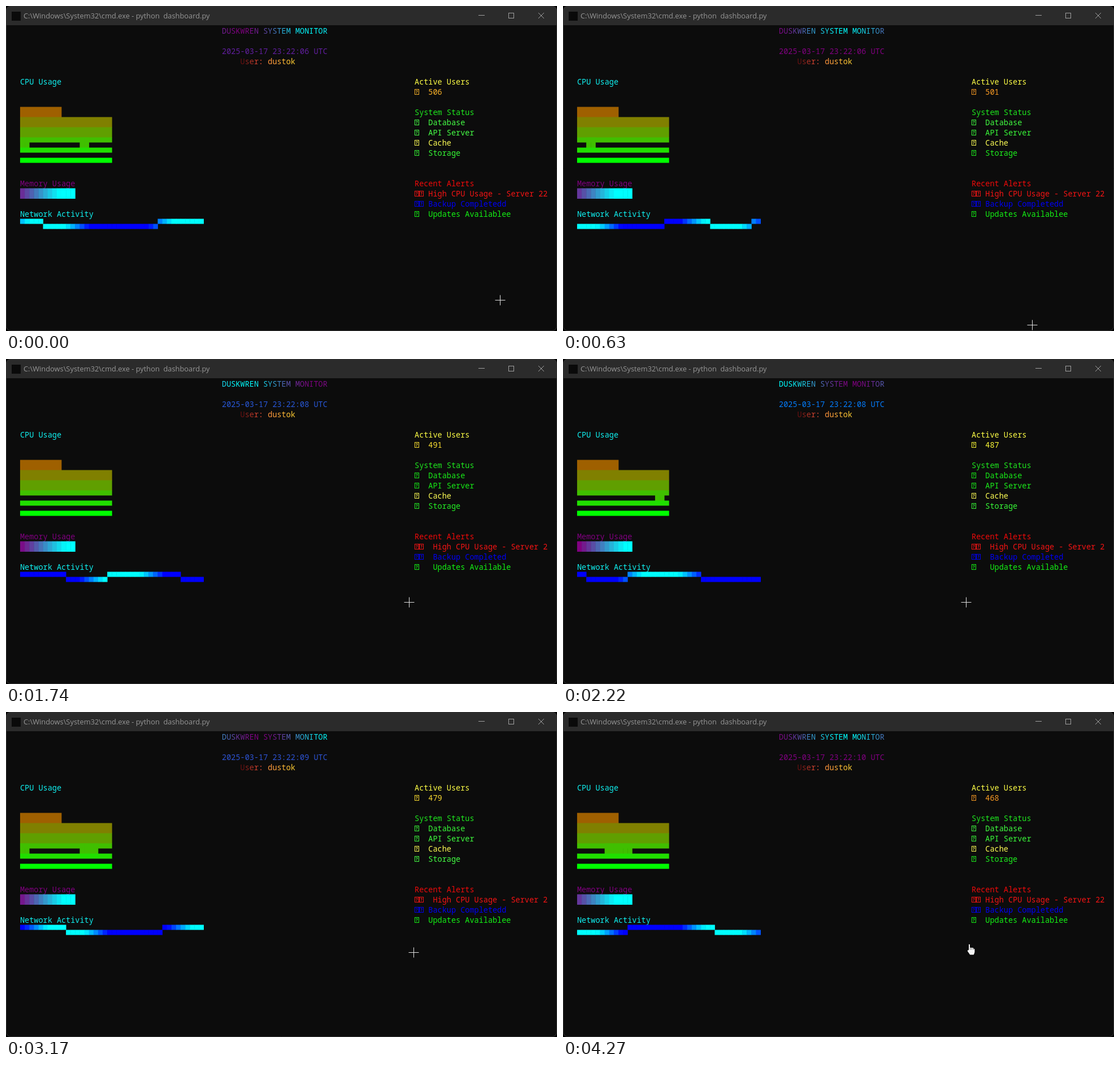
An HTML page with a canvas that plays this animation: 975 by 575 pixels, repeating every 4350 ms.

```html
<!DOCTYPE html>
<html lang="en">
<head>
<meta charset="utf-8">
<title>System monitor</title>
<style>
html, body { margin: 0; width: 100%; height: 100%; overflow: hidden; background: #000; }
canvas { display: block; }
</style>
</head>
<body>
<canvas id="stage" width="975" height="575"></canvas>
<script>
const ctx = document.getElementById('stage').getContext('2d');
const LOOP = 4350, REFRESHES = 55, CYCLE = 3650, CELL = 8.117, ROW = 18;
const PURPLE = [128, 0, 128], CYAN = [0, 255, 255];

// Cells on the network tape where the trace jumps between its two levels
const JUMPS = [5, 30, 40, 49, 65, 86, 105];
// Pointer path: [time, x, y]
const POINTER = [[0, 874, 520], [630, 830, 564], [1110, 764, 583], [1740, 713, 430], [2380, 713, 430], [2780, 721, 425]];

const clamp = v => Math.max(0, Math.min(1, v));
const mix = (a, b, k) => `rgb(${a.map((v, i) => Math.round(v + (b[i] - v) * k))})`;
const colX = col => 0.6 + col * CELL;
const rowY = row => 34.5 + row * ROW;

// 0..1 pulse, highest at the given time
const pulse = (t, peak) => 0.5 + 0.5 * Math.cos(2 * Math.PI * (t - peak) / CYCLE);
// 0..1 wave over columns, travelling left
const wave = (i, low, t) => 0.5 - 0.5 * Math.cos(0.2 * (i - low) + 2 * Math.PI * t / CYCLE);

const traceIsHigh = cell => JUMPS.filter(jump => jump <= cell).length % 2 === 0;
// Short regular spikes that widen as the load moves away from its quiet spell
const loadSpikes = cell => Math.cos(2 * Math.PI * cell / 13.9) + Math.abs(cell - 34) / 60 > 1.22;

function print(text, col, row, color) {
  ctx.font = '500 13.54px "Noto Sans Mono", monospace';
  [...text].forEach((ch, i) => {
    ctx.fillStyle = typeof color === 'function' ? color(i) : color;
    if (ch !== ' ') ctx.fillText(ch, colX(col + i), rowY(row) + 14.5);
  });
}

// Blocks overlap their neighbours slightly so that no seams show.
function block(col, row, count, color, half) {
  ctx.fillStyle = color;
  ctx.fillRect(colX(col), rowY(row) + (half === 'low' ? 9 : 0), count * CELL + 0.4, half ? 9 : 18.5);
}

function missingGlyph(col, row, color) {
  const x = Math.round(colX(col)), y = rowY(row) + 4.5;
  ctx.strokeStyle = ctx.fillStyle = color;
  ctx.lineWidth = 1;
  ctx.strokeRect(x + 0.5, y + 0.5, 7, 9);
  ctx.font = 'bold 8px "Noto Sans Mono", monospace';
  ctx.fillText('?', x + 1.6, y + 8);
}

function lines(color, segments) {
  ctx.strokeStyle = color;
  ctx.lineWidth = 1;
  ctx.beginPath();
  segments.forEach(([x1, y1, x2, y2]) => { ctx.moveTo(x1, y1); ctx.lineTo(x2, y2); });
  ctx.stroke();
}

function drawWindow() {
  ctx.fillStyle = '#000';
  ctx.fillRect(0, 0, 975, 575);
  ctx.save();
  ctx.beginPath();
  ctx.roundRect(0, 0, 975, 575, 8);
  ctx.clip();
  ctx.fillStyle = '#0c0c0c';
  ctx.fillRect(0, 0, 975, 575);
  ctx.fillStyle = '#2b2b2b';
  ctx.fillRect(0, 0, 975, 34);
  ctx.restore();
  ctx.strokeStyle = '#303030';
  ctx.lineWidth = 1;
  ctx.beginPath();
  ctx.roundRect(0.5, 0.5, 974, 574, 8);
  ctx.stroke();

  ctx.fillStyle = '#0a0a0a';
  ctx.fillRect(10, 10, 16, 16);
  ctx.fillStyle = '#969696';
  ctx.font = '12.83px "Open Sans", sans-serif';
  ctx.fillText('C:\\Windows\\System32\\cmd.exe - python\u00a0 dashboard.py', 31, 22);
  lines('#a0a0a0', [[836, 16.5, 847, 16.5], [942, 12, 952, 22], [952, 12, 942, 22]]);
  ctx.strokeRect(889.5, 12.5, 9, 9);
}

function drawHeader(t) {
  print('DUSKWREN SYSTEM MONITOR', 47, 0, i => mix(PURPLE, CYAN, wave(i, 3.5, t)));
  const second = 6 + Math.floor((t + 365) / 1000);
  print(`2025-03-17 23:22:${String(second).padStart(2, '0')} UTC`, 47, 2,
    mix(PURPLE, [0, 128, 255], pulse(t, 2425)));
  print('User: dustok', 51, 3, i => i < 5
    ? mix([105, 18, 18], [235, 80, 55], i / 4)
    : mix([255, 150, 60], [255, 205, 50], (i - 6) / 5));
}

function drawGauges(t) {
  const scroll = Math.floor(t * 0.0176);

  print('CPU Usage', 3, 5, '#10f0f0');
  for (let row = 8; row <= 13; row++) {
    const color = mix([0, 255, 0], [255, 0, 0], (13 - row) / 8);
    block(3, row, row === 8 ? 9 : 20, color, row > 10 && 'high');
    for (let i = 0; row === 11 && i < 20; i++) {
      if (loadSpikes(scroll + i)) block(3 + i, row, 1, color);
    }
  }

  print('Memory Usage', 3, 15, '#800080');
  const start = 0.22 * pulse(t, 500);
  for (let i = 0; i < 12; i++) block(3 + i, 16, 1, mix(PURPLE, CYAN, clamp(start + i * 0.1)));

  print('Network Activity', 3, 18, '#10f0f0');
  for (let i = 0; i < 40; i++) {
    const level = clamp(2 * wave(i, 21, t) - 0.72);
    block(3 + i, 19, 1, mix([0, 0, 255], CYAN, level), traceIsHigh(scroll + i) ? 'high' : 'low');
  }
}

function iconLine(text, row, color, icons = 1, col = 92) {
  for (let i = 0; i < icons; i++) missingGlyph(89 + i, row, color);
  print(text, col, row, color);
}

function drawStatus(t) {
  const users = Math.ceil(506 - 0.00891 * t - 0.3 * Math.sin(2 * Math.PI * t / LOOP));
  print('Active Users', 89, 5, '#ffff46');
  iconLine(String(users), 6, mix([250, 155, 35], [255, 255, 55], pulse(t, 2425)));

  print('System Status', 89, 8, '#1ee61e');
  const green = peak => mix([22, 234, 22], [70, 255, 70], pulse(t, peak));
  iconLine('Database', 9, green(200));
  iconLine('API Server', 10, green(0));
  iconLine('Cache', 11, '#ffff55');
  iconLine('Storage', 12, green(2900));

  // A wide icon pushes the line right; otherwise its last letter is left behind twice.
  print('Recent Alerts', 89, 15, '#f00a0a');
  const alert = (text, row, color, icons, start) => {
    const pushed = t >= start && t < start + CYCLE / 2;
    iconLine(pushed ? text : text + text.at(-1), row, color, icons, pushed ? 93 : 92);
  };
  alert('High CPU Usage - Server 2', 16, '#f51414', 2, 1340);
  alert('Backup Completed', 17, '#0000f5', 2, 1050);
  alert('Updates Available', 18, '#14f014', 1, 760);
}

function drawHand(x, y) {
  ctx.save();
  ctx.translate(x, y);
  ctx.beginPath();
  ctx.moveTo(-4.5, 1);
  ctx.lineTo(-4.5, -8.5);
  ctx.quadraticCurveTo(-3, -11, -1.5, -8.5);
  ctx.lineTo(-1.5, -3.5);
  ctx.quadraticCurveTo(3, -5, 7, -0.5);
  ctx.lineTo(7, 5);
  ctx.lineTo(5.2, 10);
  ctx.lineTo(-2, 10);
  ctx.lineTo(-6.8, 3);
  ctx.quadraticCurveTo(-7.4, 0, -4.5, 1);
  ctx.closePath();
  ctx.fillStyle = '#f4f4f4';
  ctx.fill();
  ctx.strokeStyle = '#000';
  ctx.lineWidth = 1;
  ctx.stroke();
  lines('#555', [-1.5, 1.5, 4.5].map(finger => [finger, -2.5, finger, 0.5]));
  ctx.restore();
}

function drawPointer(t) {
  if (t >= 3200) return drawHand(722, 420);
  const next = POINTER.findIndex(([time]) => time > t);
  const to = POINTER.at(next), from = next > 0 ? POINTER[next - 1] : to;
  const k = clamp((t - from[0]) / (to[0] - from[0] || 1));
  const [x, y] = [1, 2].map(n => Math.round(from[n] + (to[n] - from[n]) * k) + 0.5);
  lines('#e0e0e0', [[x - 9, y, x + 9, y], [x, y - 9, x, y + 9]]);
}

function draw(now) {
  // The screen refreshes in even steps, each shown a moment early.
  const step = Math.min(REFRESHES - 1, Math.floor((now % LOOP) / 78.7));
  const t = step * LOOP / REFRESHES;
  drawWindow();
  drawHeader(t);
  drawGauges(t);
  drawStatus(t);
  drawPointer(t);
}

const begin = performance.now();
function tick() {
  draw(performance.now() - begin);
  requestAnimationFrame(tick);
}
tick();
</script>
</body>
</html>
```
